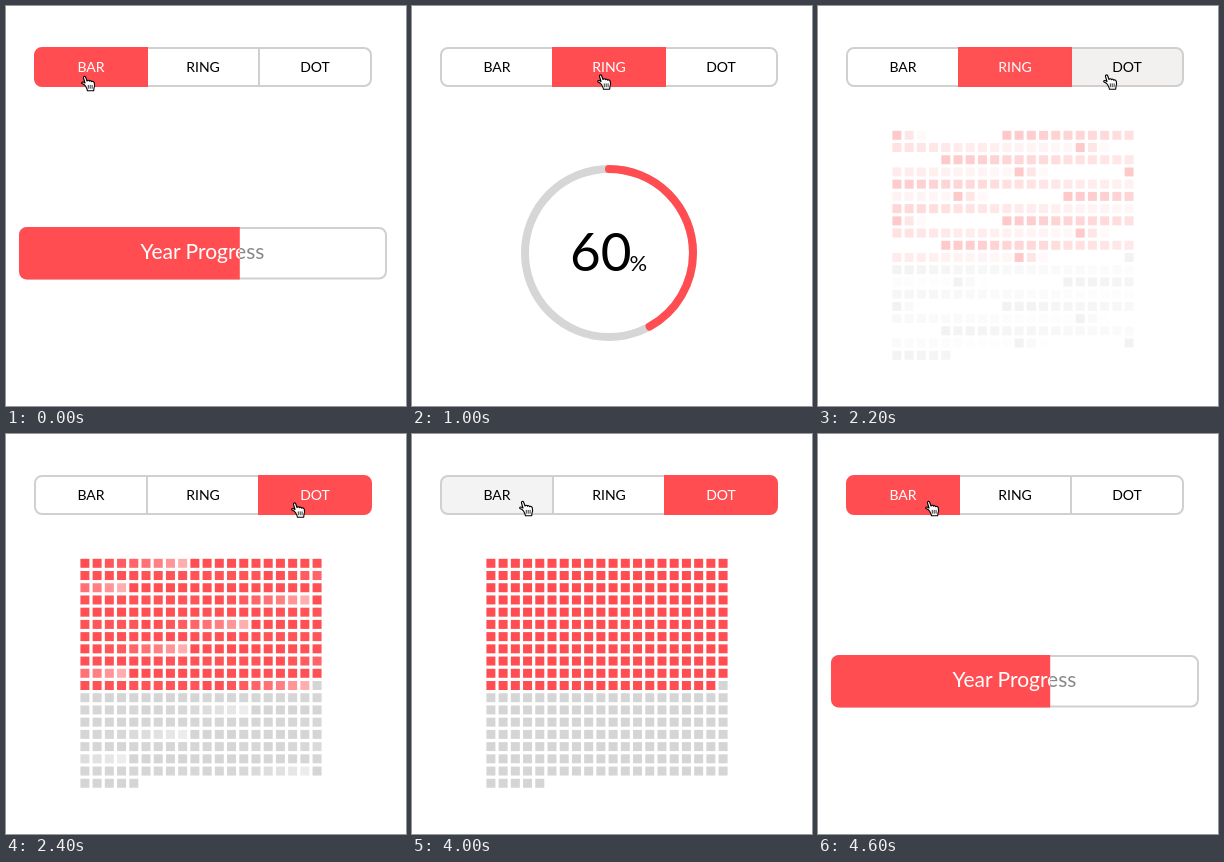
An HTML page for the animation above (4800 ms loop, 400 px wide and 400 px high).

```html
<!DOCTYPE html>
<html lang="en">
<head>
<meta charset="utf-8">
<title>Year Progress</title>
<style>
  html, body { margin: 0; width: 100%; height: 100%; overflow: hidden; background: #fff; }
  svg { display: block; width: 100%; height: 100%; font-family: Lato, "Open Sans", sans-serif; }
  .tab { font-size: 14px; text-anchor: middle; }
  .title { font-size: 21px; text-anchor: middle; }
</style>
</head>
<body>
<svg viewBox="0 0 400 400">
  <defs>
    <clipPath id="round"><rect x="13" y="221" width="368" height="52.5" rx="8"/></clipPath>
    <clipPath id="done"><rect id="doneBox" x="13" y="221" width="0" height="53"/></clipPath>
  </defs>

  <g id="bar">
    <rect x="14" y="222" width="366" height="50.5" rx="7" fill="#fff" stroke="#d0d0d0" stroke-width="2"/>
    <text class="title" x="196.5" y="253" fill="#888">Year Progress</text>
    <g clip-path="url(#done)">
      <rect x="13" y="221" width="368" height="53" fill="#ff4d51" clip-path="url(#round)"/>
      <text class="title" x="196.5" y="253" fill="#fff">Year Progress</text>
    </g>
  </g>

  <g id="ring">
    <circle cx="197" cy="247" r="84" fill="none" stroke="#d6d6d6" stroke-width="8"/>
    <circle id="arc" cx="197" cy="247" r="84" fill="none" stroke="#ff4d51" stroke-width="8"
      stroke-linecap="round" pathLength="100" transform="rotate(-90 197 247)"/>
    <text x="158" y="264.5" font-size="53">60</text>
    <text x="217.5" y="264.5" font-size="22">%</text>
  </g>

  <g id="dot"></g>
  <g id="tabs"></g>

  <g id="hand" stroke="#000" stroke-linejoin="round" stroke-linecap="round">
    <path fill="#fff" stroke-width="1.1" d="M4.5 10C3.5 8.5 2.5 8 1 7.5C0 6.5 1.5 5.5 2.8 6.2L4 7L2.5 2C2 .3 4-.3 4.7 1.3L6 5C6.3 4 8 4 8.4 5.2C9 4.3 10.4 4.6 10.8 5.7C11.5 5 13 5.5 13.3 7C13.8 9 13.5 11 13 12L12.7 14.8H6.5C6.2 13 5.3 11.5 4.5 10Z"/>
    <path fill="none" stroke-width=".8" d="M7.3 9.3v3M9.2 9.3v3M11.1 9.3v3"/>
  </g>
</svg>

<script>
const LOOP = 4800, SHARE = 0.6, DAYS = 365;
const RED = [255, 77, 81], WHITE = [255, 255, 255], HOVER = [243, 243, 243],
      LINE = [208, 208, 208], BLACK = [0, 0, 0];
const $ = id => document.getElementById(id);
const clamp = v => Math.max(0, Math.min(1, v));
const mix = (a, b, k) => `rgb(${a.map((v, i) => Math.round(v + (b[i] - v) * k))})`;

function add(parent, tag, attrs) {
  const el = document.createElementNS("http://www.w3.org/2000/svg", tag);
  for (const key in attrs) el.setAttribute(key, attrs[key]);
  return parent.appendChild(el);
}

// The CSS "ease" curve, cubic-bezier(.25, .1, .25, 1)
function ease(x) {
  x = clamp(x);
  let lo = 0, hi = 1;
  const curve = (s, a, b) => 3 * (1 - s) ** 2 * s * a + 3 * (1 - s) * s * s * b + s ** 3;
  for (let i = 0; i < 20; i++) {
    const mid = (lo + hi) / 2;
    if (curve(mid, .25, .25) < x) lo = mid; else hi = mid;
  }
  return curve((lo + hi) / 2, .1, 1);
}

// on/off: when a tab becomes active and loses that state
const tabs = [
  { name: "BAR", x: 85, on: 4185, off: 795, d: "M141 42H36a7 7 0 0 0-7 7v24a7 7 0 0 0 7 7H141z" },
  { name: "RING", x: 197, on: 795, off: 2195, d: "M141 42h112v38H141z" },
  { name: "DOT", x: 309, on: 2195, off: 4185, d: "M253 42h105a7 7 0 0 1 7 7v24a7 7 0 0 1-7 7H253z" }
];
for (const tab of tabs) {
  tab.g = add($("tabs"), "g", {});
  tab.box = add(tab.g, "path", { d: tab.d, "stroke-width": 2 });
  tab.label = add(tab.g, "text", { x: tab.x, y: 66, class: "tab" });
  tab.label.textContent = tab.name;
}

const dots = Array.from({ length: DAYS }, (_, i) => {
  const r = i % 35;
  return {
    delay: r < 9 ? r * 22.5 : (r - 9) * 1.7,
    el: add($("dot"), "rect", {
      x: 74.4 + i % 20 * 12.22, y: 124.8 + Math.floor(i / 20) * 12.22,
      width: 9, height: 9, fill: i < DAYS * SHARE ? "#ff4d51" : "#d5d5d5"
    })
  };
});

// Pointer stops: time, x, y
const path = [
  [0, 75, 70], [220, 75, 70], [390, 185, 68.5], [1580, 185, 68.5], [1790, 285, 68.5],
  [3700, 285, 68.5], [3960, 107, 67], [4610, 107, 67], [4790, 75, 70], [LOOP, 75, 70]
];
function pointer(t) {
  const i = path.findIndex(p => p[0] > t), a = path[i - 1], b = path[i];
  const u = (t - a[0]) / (b[0] - a[0]), k = u * u * (3 - 2 * u);
  return [a[1] + (b[1] - a[1]) * k, a[2] + (b[2] - a[2]) * k];
}

function drawTabs(t, tipX) {
  for (const tab of tabs) {
    const since = (t - tab.on + LOOP) % LOOP, left = (t - tab.off + LOOP) % LOOP;
    const active = since < left;
    const k = active ? ease(since / 200) : 1 - ease(left / 200);
    const hover = Math.abs(tipX - tab.x) < 56;
    tab.box.setAttribute("fill", mix(hover ? HOVER : WHITE, RED, k));
    tab.box.setAttribute("stroke", mix(LINE, RED, k));
    tab.label.setAttribute("fill", mix(BLACK, WHITE, k));
    if (k > .5 && $("tabs").lastChild !== tab.g) $("tabs").append(tab.g);
  }
}

function draw(t) {
  const view = t < 795 || t >= 4175 ? "bar" : t < 2140 ? "ring" : "dot";
  for (const id of ["bar", "ring", "dot"]) $(id).style.display = id === view ? "" : "none";

  if (view === "bar") {
    const k = ease((t - 4175 + LOOP) % LOOP / 480);
    $("doneBox").setAttribute("width", 368 * SHARE * k);
  } else if (view === "ring") {
    $("arc").setAttribute("stroke-dasharray", `${100 * SHARE * ease((t - 795) / 500)} 200`);
  } else {
    for (const dot of dots) dot.el.setAttribute("opacity", ease((t - 2140 - dot.delay) / 300));
  }

  const [x, y] = pointer(t);
  drawTabs(t, x + 4);
  $("hand").setAttribute("transform", `translate(${x} ${y})`);
}

function tick() {
  draw(performance.now() % LOOP);
  requestAnimationFrame(tick);
}
tick();
</script>
</body>
</html>
```
